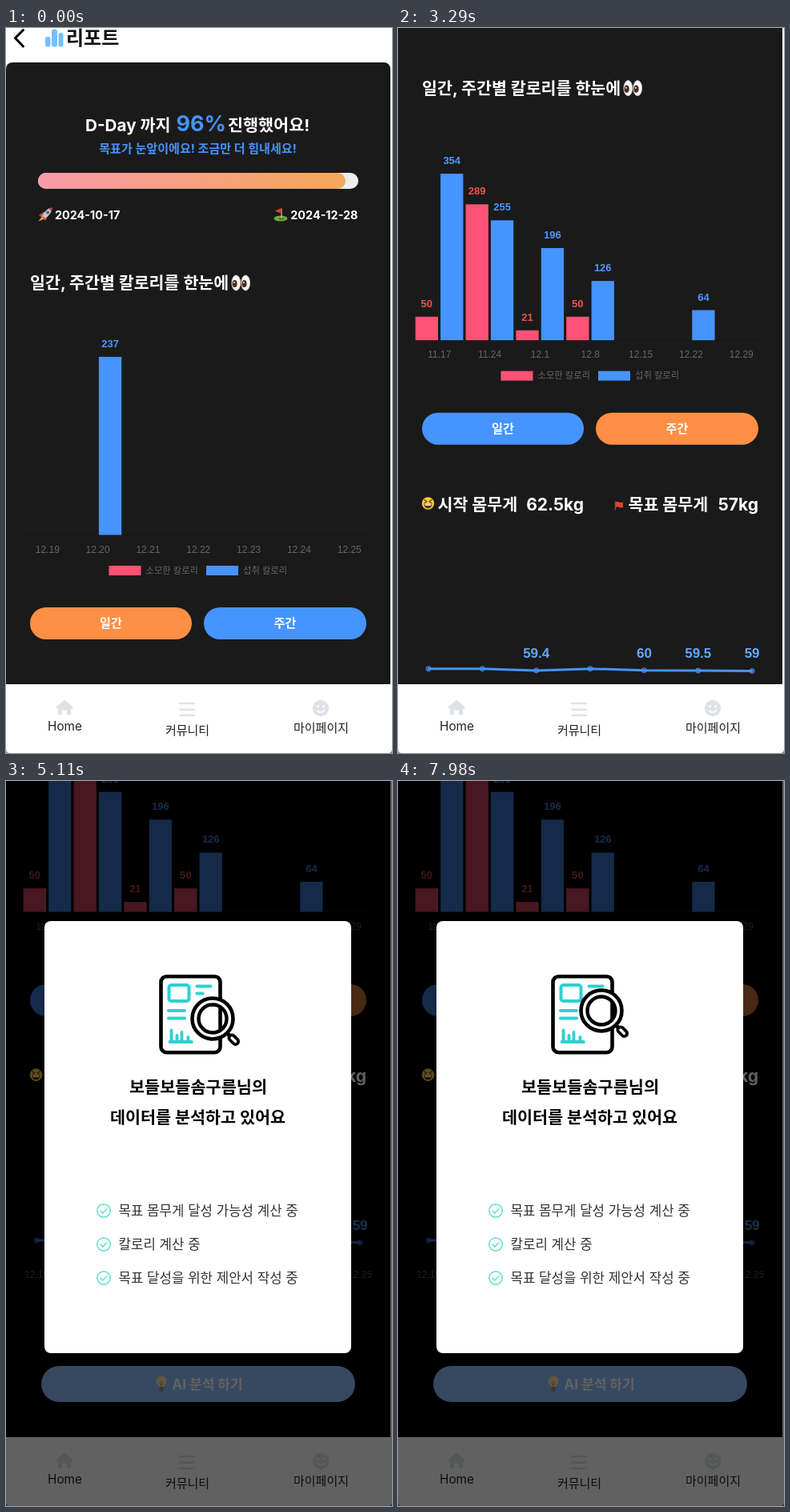
Write an HTML page that moves like this. It is 482 by 906 pixels and loops after 8000 ms.

```html
<!DOCTYPE html>
<html lang="ko">
<head>
<meta charset="utf-8">
<style>
  html, body { margin: 0; width: 100%; height: 100%; overflow: hidden; background: #fff; }
  svg { display: block; width: 482px; height: 906px; }
  text { font-family: Inter, "Noto Sans CJK KR", "Noto Sans CJK", sans-serif; }
  .b { font-weight: 700; }
  .num { font-family: "Liberation Sans", "Noto Sans CJK KR", "Noto Sans CJK", sans-serif; }
</style>
</head>
<body>
<svg id="stage" viewBox="0 0 482 906" xmlns="http://www.w3.org/2000/svg"></svg>
<script>
const LOOP = 8000, SWITCH = 1590, MODAL = 5110, LENS_LOOP = 2700;
const BLUE = '#4694ff', RED = '#ff5274', ORANGE = '#ff8f45', DARK = '#1a1a1a', GRAY = '#666', TEAL = '#2fd0d0';
const BASE = 633.5, STEP = 62.83, BAR_W = 28.3;
const days = ['12.19', '12.20', '12.21', '12.22', '12.23', '12.24', '12.25'];
const weeks = ['11.17', '11.24', '12.1', '12.8', '12.15', '12.22', '12.29'];
const series = [
  { color: RED, label: '#ef5350', x: 21.7, day: [0, 0, 0, 0, 0, 0, 0], week: [50, 289, 21, 50, 0, 0, 0] },
  { color: BLUE, label: '#4a98ff', x: 53.1, day: [0, 237, 0, 0, 0, 0, 0], week: [354, 255, 196, 126, 0, 64, 0] }
];
const DAY_SCALE = 0.939, WEEK_SCALE = 0.5876;

const text = (x, y, size, fill, str, cls = 'b', anchor = 'start', id = '') =>
  `<text x="${x}" y="${y}" font-size="${size}" fill="${fill}" class="${cls}" text-anchor="${anchor}" ${id && `id="${id}"`}>${str}</text>`;
const rect = (x, y, w, h, r, fill, more = '') =>
  `<rect x="${x}" y="${y}" width="${w}" height="${h}" rx="${r}" fill="${fill}" ${more}/>`;
const circle = (x, y, r, fill, more = '') => `<circle cx="${x}" cy="${y}" r="${r}" fill="${fill}" ${more}/>`;
const line = (d, color, w, more = '') =>
  `<path d="${d}" fill="none" stroke="${color}" stroke-width="${w}" stroke-linecap="round" stroke-linejoin="round" ${more}/>`;
const shape = (d, fill) => `<path d="${d}" fill="${fill}"/>`;

function header() {
  return line('M21.5 2.5 L11.5 12.5 L21.5 23', '#000', 3) +
    rect(49, 11, 6.5, 12.5, 2.5, '#74c0fc') + rect(57, 1.5, 7, 22, 2.5, '#74c0fc') + rect(65.5, 6, 6, 17.5, 2.5, '#74c0fc') +
    text(75, 20.5, 24, '#111', '리포트');
}

function rocket() {
  return shape('M41 234 L47 230 L50 231 L45 237Z M50 240 L53 233 L49 236 L47 240Z', '#d8433c') +
    shape('M57.5 224.5 Q50 225 45 235 L48.5 238 Q57 233 57.5 224.5Z', '#b9c6cf') +
    shape('M57.5 224.5 L53 225.5 L57 229.5Z', '#d8433c') +
    circle(52, 230.5, 1.9, '#3c6f92') + shape('M45 235.5 L40.5 241.5 L48 238.5Z', '#f7a52e');
}

function golfFlag() {
  return `<ellipse cx="343" cy="238" rx="8.5" ry="3.6" fill="#6fa83c"/><ellipse cx="344" cy="238.3" rx="3" ry="1.2" fill="#38571f"/>` +
    line('M344 238 V226', '#c9c9c9', 1.2) + shape('M344 225 L335.5 228.5 L344 232Z', '#e23b32');
}

function eyes() {
  return [287.3, 299.2].map(x =>
    `<ellipse cx="${x}" cy="318.5" rx="5.4" ry="9.6" fill="#f5f5f5" stroke="#cfcfcf" stroke-width=".8"/>` +
    `<ellipse cx="${x - 1.7}" cy="319.5" rx="3" ry="4.6" fill="#4a2a20"/>` + circle(x - 2.4, 318, 1, '#fff')).join('');
}

function intro() {
  return text(99, 128.5, 20.7, '#fff', 'D-Day 까지') + text(212.5, 129, 27, BLUE, '96%') + text(277, 128.5, 20.7, '#fff', '진행했어요!') +
    text(239.5, 155.5, 15.1, BLUE, '목표가 눈앞이에요! 조금만 더 힘내세요!', 'b', 'middle') +
    rect(40, 181, 400, 20, 10, '#eee') + rect(40, 181, 384, 20, 10, 'url(#warm)') +
    rocket() + text(61, 238.5, 14.4, '#fff', '2024-10-17') +
    golfFlag() + text(439.5, 238.5, 14.4, '#fff', '2024-12-28', 'b', 'end') +
    text(30, 326, 20.6, '#fff', '일간, 주간별 칼로리를 한눈에') + eyes();
}

function calories() {
  let out = line(`M22 ${BASE} H457`, '#151515', 1);
  series.forEach((s, k) => s.week.forEach((_, i) => {
    const x = s.x + STEP * i;
    out += rect(x, BASE, BAR_W, 0, 0, s.color, `id="bar${k}${i}"`) +
      text(x + BAR_W / 2, 0, 13, s.label, '', 'b num', 'middle', `val${k}${i}`);
  }));
  days.forEach((_, i) => out += text(51.8 + STEP * i, 655.5, 12, GRAY, '', 'num', 'middle', 'tick' + i));
  return out + rect(128.5, 672, 40, 12, 0, RED) + text(174.5, 681.5, 11.3, GRAY, '소모한 칼로리', 'num') +
    rect(250, 672, 40, 12, 0, BLUE) + text(296, 681.5, 11.3, GRAY, '섭취 칼로리', 'num');
}

function tabs() {
  return rect(30, 724, 202, 40, 20, ORANGE, 'id="tabDay"') + rect(247, 724, 203, 40, 20, BLUE, 'id="tabWeek"') +
    text(131, 749, 15.2, '#fff', '일간', 'b', 'middle') + text(348.5, 749, 15.2, '#fff', '주간', 'b', 'middle');
}

function goals() {
  return circle(37.5, 837.3, 7.7, '#fbc93d') +
    line('M33 833 L36 835 L33 837 M42 833 L39 835 L42 837', '#59351c', 1.2) +
    shape('M32.5 838.5 H42.5 Q42 843.5 37.5 843.5 Q33 843.5 32.5 838.5Z', '#59351c') + rect(33.8, 838.6, 7.4, 1.5, 0.5, '#fff') +
    text(49.5, 846, 20.6, '#fff', '시작 몸무게') + text(232, 846, 21, '#fff', '62.5kg', 'b', 'end') +
    line('M271.5 835.5 V845', '#8b5a48', 1.2) + shape('M272 835.5 Q274.5 834.5 276.5 836 Q279 837 281 835.5 V842 Q279 843.5 276.5 842.3 Q274.5 841 272 842Z', '#e2402f') +
    text(287.5, 846, 20.6, '#fff', '목표 몸무게') + text(450, 846, 21, '#fff', '57kg', 'b', 'end');
}

function weight() {
  const ys = [1044, 1044, 1046.3, 1044, 1046, 1046.4, 1046.8];
  const names = ['', '', '59.4', '', '60', '59.5', '59'];
  const px = i => 38 + 67.35 * i;
  let out = line('M' + ys.map((y, i) => `${px(i)} ${y}`).join(' L'), BLUE, 3);
  ys.forEach((y, i) => out += circle(px(i), y, 3, 'rgba(70,148,255,.3)', `stroke="${BLUE}"`) +
    text(px(i), 1030.5, 17, '#65a7ff', names[i], 'b num', 'middle') +
    text(px(i), 1091, 12, GRAY, days[i], 'num', 'middle'));
  return out;
}

function ask() {
  return text(239.5, 1177, 20.6, '#fff', '현재 잘 하고 있는지 궁금하다면 ?', 'b', 'middle') +
    rect(44, 1201, 392, 45, 22.5, '#90c0ff') +
    shape('M191 1227 Q187.5 1222.5 187.5 1220 A6.5 6.5 0 0 1 200.5 1220 Q200.5 1222.5 197 1227Z', '#fbe3b0') +
    line('M192.5 1220 L194 1226 L195.5 1220', '#e39a3b', 1) + rect(191.3, 1227, 5.4, 6, 1.5, '#8d8f95') +
    text(207.5, 1230, 17, '#fff', 'AI 분석 하기');
}

function nav() {
  const c = '#dee2e6', ink = '#222';
  return rect(0, 819, 480, 1, 0, '#111') + rect(0, 820, 482, 86, 0, '#fff') +
    shape('M73 839.5 L84 849 Q84 850.5 82 850.5 H81 V857 Q81 858.5 79.5 858.5 H76 V852.5 H70 V858.5 H66.5 Q65 858.5 65 857 V850.5 H64 Q62 850.5 62 849Z', c) +
    line('M217.5 844 H235 M217.5 851.7 H235 M217.5 859 H235', c, 2.6) +
    circle(393, 850, 10.2, c) + circle(389.5, 847.5, 1.5, '#fff') + circle(396.5, 847.5, 1.5, '#fff') +
    line('M388.5 853 Q393 857.5 397.5 853', '#fff', 1.6) +
    text(73.5, 878, 15.3, ink, 'Home', '', 'middle') + text(226.5, 882.5, 15, ink, '커뮤니티', '', 'middle') +
    text(393.5, 879.5, 15, ink, '마이페이지', '', 'middle') +
    shape('M0 901 Q0 906 5 906 H0Z M482 901 Q482 906 477 906 H482Z', '#888');
}

const sheet = color => rect(193.5, 244.2, 74, 95, 7, '#fff', 'stroke="#000" stroke-width="4.6"') +
  rect(203.5, 255, 25, 20, 3, 'none', `stroke="${color}" stroke-width="4"`) +
  line('M238.5 256.5 H255.5 M238.5 265.5 H245.5 M203 287 H223 M203 296.5 H223', color, 4) +
  line('M204.5 326 H232 M206.5 326 V311.5 M213.5 326 V318 M219.5 326 V314 M227.5 326 V320', color, 3.8);

function modal() {
  const items = ['목표 몸무게 달성 가능성 계산 중', '칼로리 계산 중', '목표 달성을 위한 제안서 작성 중'];
  return rect(0, 0, 482, 906, 0, '#000', 'opacity=".62"') + rect(48, 175, 383, 540, 8, '#fff') + sheet(TEAL) +
    `<g id="lens">${line('M19 19 L25 25', '#000', 5)}${line('M24 24 L28.5 28.5', '#000', 11)}${line('M24 24 L28.5 28.5', '#fff', 3.4)}
     ${circle(0, 0, 25.5, '#fff', 'stroke="#000" stroke-width="4.6"')}</g>
     <g clip-path="url(#glass)">${rect(180, 230, 130, 120, 0, '#fff')}${sheet('#000')}</g>` +
    circle(0, 0, 17.5, 'none', 'id="rim" stroke="#000" stroke-width="4.4"') +
    text(240, 390, 20.8, '#000', '보들보들솜구름님의', 'b', 'middle') +
    text(239.5, 428, 20.7, '#000', '데이터를 분석하고 있어요', 'b', 'middle') +
    items.map((s, i) => {
      const y = 537 + 42 * i;
      return circle(122, y, 8.2, 'none', 'stroke="#72e4d1" stroke-width="1.8"') +
        line(`M118.3 ${y + 0.3} l2.7 2.7 l4.8 -5`, '#72e4d1', 1.8) + text(140.5, y + 5.5, 16.8, '#333', s, '');
    }).join('');
}

const stage = document.getElementById('stage');
stage.innerHTML = `<defs>
  <linearGradient id="warm"><stop offset="0" stop-color="#f99aa8"/><stop offset="1" stop-color="#f4a85a"/></linearGradient>
  <clipPath id="glass"><circle id="hole" r="17.5"/></clipPath></defs>
  ${rect(0, 0, 482, 906, 0, '#fff')}
  <g id="page">${header()}${rect(0, 43, 480, 1400, 8, DARK, 'id="panel"')}${intro()}
  <g id="charts">${calories()}${tabs()}${weight()}</g>${goals()}${ask()}</g>
  ${nav()}<g id="modal">${modal()}</g>`;
const el = {};
stage.querySelectorAll('[id]').forEach(n => el[n.id] = n);
const set = (id, attrs) => { for (const k in attrs) el[id].setAttribute(k, attrs[k]); };

const scrollKeys = [[2660, 0], [2730, 1], [2800, 30], [2940, 180], [3080, 241], [3220, 242], [3290, 243],
  [3430, 290], [3640, 400], [3850, 440], [3920, 441], [4060, 442], [4200, 456], [4410, 470]];
const lensKeys = [[0, 258, 297], [170, 254, 287], [600, 238, 272], [1260, 218, 269], [1900, 215, 298], [2300, 236, 309], [LENS_LOOP, 258, 297]];

function along(keys, t, col) {
  if (t <= keys[0][0]) return keys[0][col];
  const i = keys.findIndex(k => k[0] > t);
  if (i < 0) return keys[keys.length - 1][col];
  const a = keys[i - 1], b = keys[i];
  return a[col] + (b[col] - a[col]) * (t - a[0]) / (b[0] - a[0]);
}

// Smooth closed path through timed points
function orbit(t, col) {
  const n = lensKeys.length - 1, i = lensKeys.findIndex(k => k[0] > t) - 1;
  const at = j => {
    const m = (j + n) % n;
    return [lensKeys[m][0] + Math.floor(j / n) * LENS_LOOP, lensKeys[m][col]];
  };
  const [p, a, b, q] = [at(i - 1), at(i), at(i + 1), at(i + 2)];
  const d = b[0] - a[0], u = (t - a[0]) / d;
  const ma = (b[1] - p[1]) / (b[0] - p[0]) * d, mb = (q[1] - a[1]) / (q[0] - a[0]) * d;
  const u2 = u * u, u3 = u2 * u;
  return (2 * u3 - 3 * u2 + 1) * a[1] + (u3 - 2 * u2 + u) * ma + (3 * u2 - 2 * u3) * b[1] + (u3 - u2) * mb;
}

function draw(t) {
  const weekly = t >= SWITCH, dim = t >= MODAL;
  const u = Math.min(1, Math.max(0, (t - SWITCH) / 1000)), ease = 1 - (1 - u) ** 4;
  series.forEach((s, k) => s.week.forEach((w, i) => {
    const from = s.day[i] * DAY_SCALE, h = from + (w * WEEK_SCALE - from) * ease;
    set(`bar${k}${i}`, { y: BASE - h, height: h });
    set(`val${k}${i}`, { y: BASE - h - 12 });
    el[`val${k}${i}`].textContent = (weekly ? w : s.day[i]) || '';
  }));
  days.forEach((d, i) => el['tick' + i].textContent = weekly ? weeks[i] : d);
  set('tabDay', { fill: weekly ? BLUE : ORANGE });
  set('tabWeek', { fill: weekly ? ORANGE : BLUE });
  set('page', { transform: `translate(0 ${-along(scrollKeys, t, 1)})` });
  set('panel', { fill: dim ? '#000' : DARK });
  set('charts', { opacity: dim ? 0.75 : 1 });
  set('modal', { display: dim ? 'inline' : 'none' });
  if (dim) {
    const p = (t - MODAL) % LENS_LOOP, cx = orbit(p, 1), cy = orbit(p, 2);
    set('lens', { transform: `translate(${cx} ${cy})` });
    set('rim', { cx, cy });
    set('hole', { cx, cy });
  }
}

const start = performance.now();
function tick() {
  draw((performance.now() - start) % LOOP);
  requestAnimationFrame(tick);
}
tick();
</script>
</body>
</html>
```
